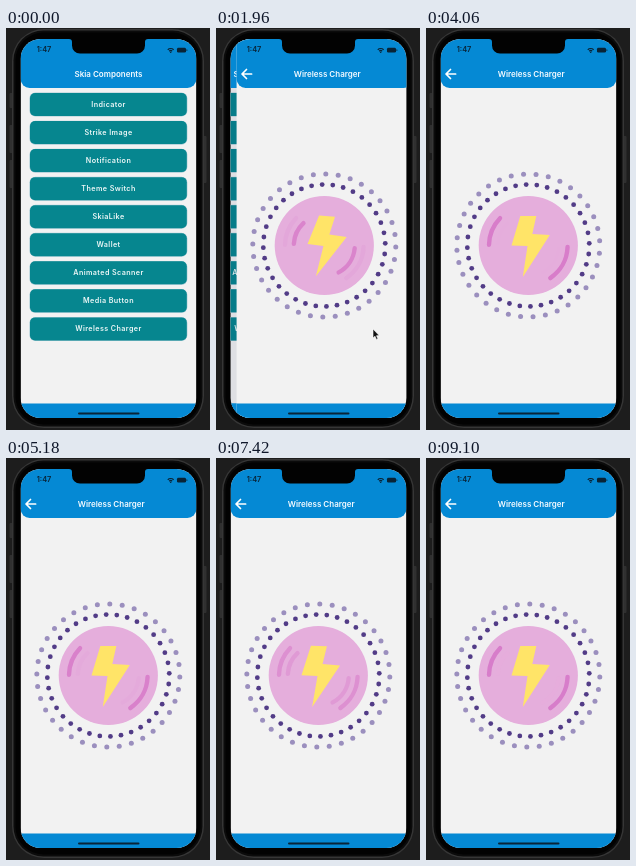
Animation, 204 px wide and 402 px high, one loop 9240 ms. Source, as an HTML page with a canvas:

```html
<!DOCTYPE html>
<html lang="en">
<head>
<meta charset="utf-8">
<title>Skia Components</title>
<style>
html, body { margin: 0; width: 100%; height: 100%; overflow: hidden; background: #1d1d1d; }
canvas { display: block; width: 204px; height: 402px; }
</style>
</head>
<body>
<canvas id="stage"></canvas>
<script>
const W = 204, H = 402, LOOP = 9240, STEP = 140;
const FONT = 'Inter, "Open Sans", sans-serif';
const BLUE = '#0589d4', PAPER = '#f2f2f2', TEAL = '#06868f', BLACK = '#020202';
const SCREEN = { x: 14.6, y: 11, w: 175.8, h: 379 };
const HUB = { x: 102.3, y: 217.5 };
const MENU = ['Indicator', 'Strike Image', 'Notification', 'Theme Switch', 'SkiaLike',
  'Wallet', 'Animated Scanner', 'Media Button', 'Wireless Charger'];

const canvas = document.getElementById('stage');
const c = canvas.getContext('2d');
const dpr = window.devicePixelRatio || 1;
canvas.width = W * dpr;
canvas.height = H * dpr;

const clamp = v => Math.min(1, Math.max(0, v));
const smooth = v => { v = clamp(v); return v * v * (3 - 2 * v); };
const span = (t, a, b) => smooth((t - a) / (b - a));
const rad = deg => deg * Math.PI / 180;

function box(x, y, w, h, r, fill) {
  c.beginPath();
  c.roundRect(x, y, w, h, r);
  c.fillStyle = fill;
  c.fill();
}

function label(text, x, y, size, color, spacing = 0) {
  c.font = `600 ${size}px ${FONT}`;
  c.letterSpacing = spacing + 'px';
  c.textAlign = 'center';
  c.textBaseline = 'middle';
  c.fillStyle = color;
  c.fillText(text, x + spacing / 2, y);
}

function poly(points, fill) {
  c.beginPath();
  points.forEach(([x, y]) => c.lineTo(x, y));
  c.closePath();
  c.fillStyle = fill;
  c.fill();
}

function page(title, x) {
  box(SCREEN.x, 11, SCREEN.w, 379, 0, PAPER);
  box(SCREEN.x, 11, SCREEN.w, 49, [0, 0, 9, 9], BLUE);
  box(SCREEN.x, 375.5, SCREEN.w, 15, 0, BLUE);
  label(title, x, 46.3, 8, '#f4faff');
}

function menu(t) {
  page('Skia Components', 102.5);
  const press = span(t, 1380, 1520) * (1 - span(t, 1700, 1900));
  MENU.forEach((name, i) => {
    const y = 65 + i * 28.05;
    c.save();
    if (i === MENU.length - 1) c.globalAlpha = 1 - 0.6 * press;
    box(23.4, y - 0.4, 158, 24, 6, '#a9ccd6');
    box(24, y, 156.8, 23, 5, TEAL);
    label(name, 102.3, y + 11.7, 7.2, '#edf7f7', 0.4);
    c.restore();
  });
}

function ring(radius, size, color, turn) {
  c.fillStyle = color;
  for (let i = 0; i < 36; i++) {
    const a = rad(i * 10 + turn);
    c.beginPath();
    c.arc(HUB.x + radius * Math.cos(a), HUB.y + radius * Math.sin(a), size, 0, 7);
    c.fill();
  }
}

function waves(radius, alpha, left, right) {
  c.globalAlpha = alpha;
  for (const [from, to] of [left, right]) {
    c.beginPath();
    c.arc(HUB.x, HUB.y, radius, rad(from), rad(to));
    c.stroke();
  }
  c.globalAlpha = 1;
}

// slow swell towards the inner waves, then a quick return
function swell(t) {
  const p = ((t + 980) % 1000) / 1000;
  return p < 0.92 ? smooth(p / 0.92) : 1 - smooth((p - 0.92) / 0.08);
}

function charger(t) {
  page('Wireless Charger', 105.2);
  c.lineCap = c.lineJoin = 'round';

  c.strokeStyle = '#fff';
  c.lineWidth = 1.7;
  c.beginPath();
  c.moveTo(24.5, 41.5);
  c.lineTo(20, 46);
  c.lineTo(24.5, 50.5);
  c.moveTo(20.4, 46);
  c.lineTo(29.6, 46);
  c.stroke();

  // the outer ring ticks on by half a gap each second
  ring(71.5, 2.5, '#9b8fbe', 1.2 + 5 * (Math.floor(t / 1000) - 1));
  ring(61, 2.4, '#523c87', -2);

  c.beginPath();
  c.arc(HUB.x, HUB.y, 49.6, 0, 7);
  c.fillStyle = '#e5aedc';
  c.fill();

  const k = swell(t);
  c.strokeStyle = '#d87dca';
  c.lineWidth = 4.4;
  waves(39.3, 1 - k, [181, 224], [2, 56]);
  waves(30.5, k, [183, 227], [5, 62]);

  c.save();
  c.translate(HUB.x, HUB.y);
  c.rotate(rad(7.5 * k * k));
  poly([[-8, -29.5], [8, -29.5], [4, -11.5], [21.5, -10.5], [-5.5, 31.5],
    [-0.8, 0.6], [-16.8, 0]], '#ffe468');
  c.restore();
}

function pointer(t) {
  if (t < 420 || t >= 2660) return;
  const k = span(t, 350, 1120);
  c.save();
  c.translate(187 - 30 * k, 337 - 36 * k);
  poly([[0, 0], [0, 9], [2, 7.2], [3.4, 10.4], [4.9, 9.8], [3.5, 6.7], [6.2, 6.6]], '#111');
  c.strokeStyle = '#fff';
  c.lineWidth = 0.6;
  c.stroke();
  c.restore();
}

function statusBar() {
  const ink = '#092437';
  label('1:47', 38, 22.2, 7.4, ink);
  c.strokeStyle = ink;
  c.lineCap = 'butt';
  c.lineWidth = 1.2;
  for (const r of [2.1, 4.2]) {
    c.beginPath();
    c.arc(164.7, 24.7, r, rad(225), rad(315));
    c.stroke();
  }
  c.beginPath();
  c.arc(164.7, 24.2, 0.8, 0, 7);
  c.fillStyle = ink;
  c.fill();
  box(171, 19.8, 9, 4.8, 1.4, ink);
  box(180.5, 21.3, 0.8, 1.8, 0.4, ink);
  box(72, 384.6, 61.5, 2, 1, ink);
}

function notch() {
  const l = 66, r = 139, top = 11, low = 25.6;
  c.beginPath();
  c.moveTo(l - 3, top - 2);
  c.lineTo(l - 3, top);
  c.quadraticCurveTo(l, top, l, top + 3);
  c.arcTo(l, low, l + 8, low, 8);
  c.arcTo(r, low, r, low - 8, 8);
  c.lineTo(r, top + 3);
  c.quadraticCurveTo(r, top, r + 3, top);
  c.lineTo(r + 3, top - 2);
  c.fillStyle = BLACK;
  c.fill();
}

function phone() {
  box(0, 0, W, H, 0, '#1d1d1d');
  for (const [y, h] of [[65, 15], [97, 28], [132, 28]]) box(3.5, y, 4, h, 1, '#303030');
  box(197, 108, 3.5, 47, 1, '#303030');
  box(6, 1, 192, 399, 32, '#363636');
  box(7.5, 2.5, 189, 396, 30, '#0b0b0b');
  box(9.5, 4.5, 185, 392, 28, BLACK);
}

function slide(t) {
  const u = Math.max(0, t - 1675) / 1000 * 18.26;
  return t > 2400 ? 0 : (1 + u) * Math.exp(-u);
}

function draw(t) {
  c.setTransform(dpr, 0, 0, dpr, 0, 0);
  phone();
  c.save();
  c.beginPath();
  c.roundRect(SCREEN.x, SCREEN.y, SCREEN.w, SCREEN.h, 20);
  c.clip();

  const off = slide(t);
  if (off > 0) {
    c.save();
    c.translate(-0.3 * SCREEN.w * (1 - off), 0);
    menu(t);
    c.restore();
    if (off < 1) {
      box(SCREEN.x, 60, SCREEN.w, 315.5, 0, `rgba(20,30,70,${0.09 * (1 - off)})`);
      box(SCREEN.x, 375.5, SCREEN.w, 15, 0, BLUE);
    }
  }
  if (off < 1) {
    c.save();
    c.translate(SCREEN.w * off, 0);
    charger(t);
    c.restore();
  }
  statusBar();
  c.restore();

  notch();
  pointer(t);
}

const start = performance.now();
function tick() {
  const t = Math.max(0, performance.now() - start) % LOOP;
  draw(Math.floor(t / STEP) * STEP);
  requestAnimationFrame(tick);
}
tick();
</script>
</body>
</html>
```
